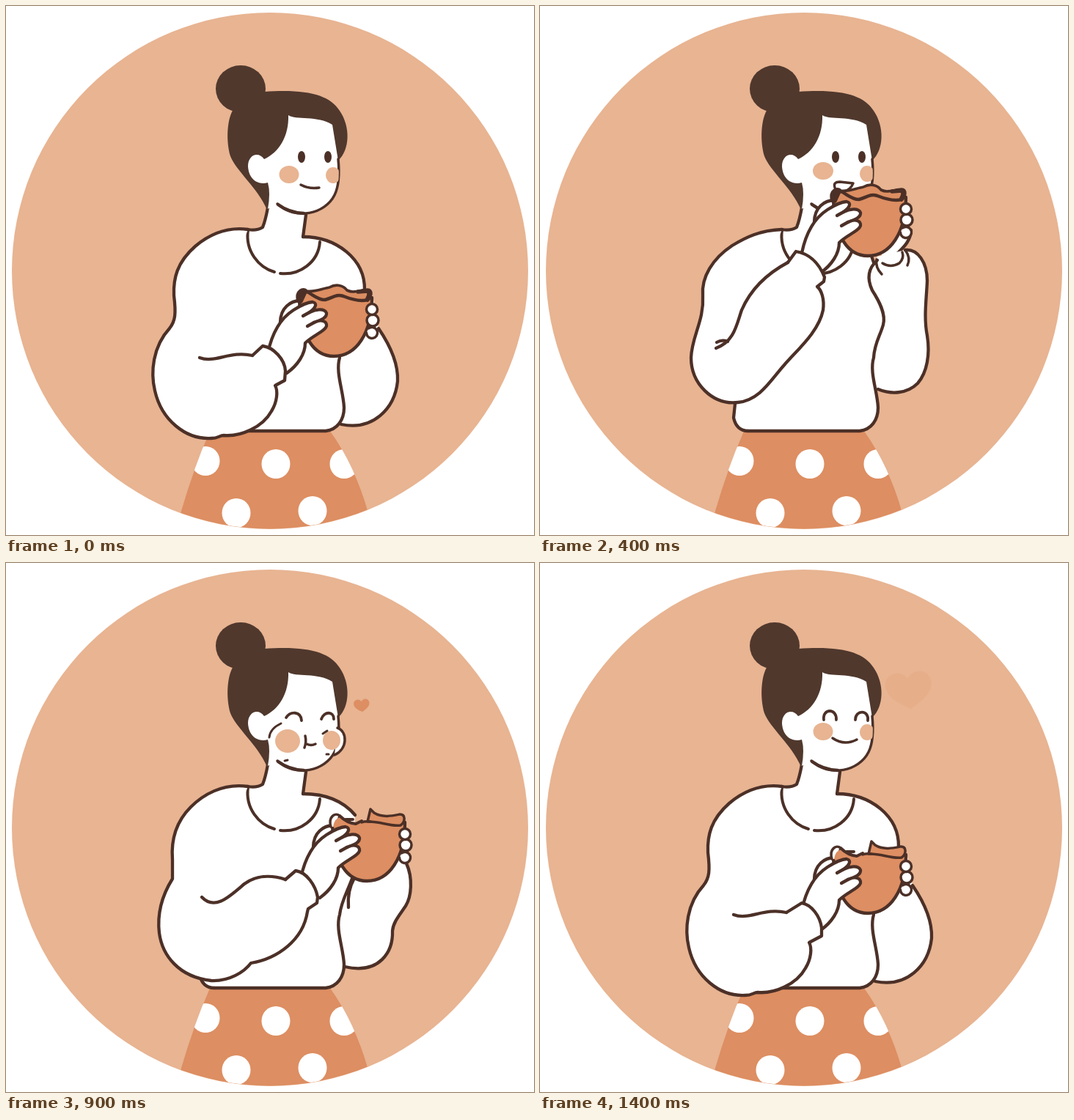
Animation, 720 px wide and 722 px high, one loop 1.5 s. Source, as an HTML page with a canvas:

```html
<!DOCTYPE html>
<html lang="en">
<head>
<meta charset="utf-8">
<title>Snack time</title>
<style>
html, body { margin: 0; width: 100%; height: 100%; overflow: hidden; background: #fff; }
canvas { display: block; width: 100%; height: 100%; }
</style>
</head>
<body>
<canvas id="stage" width="720" height="722"></canvas>
<script>
const ctx = document.getElementById('stage').getContext('2d');
const SKIN = '#fff', PEACH = '#e8b492', ORANGE = '#dd8e62', HAIR = '#50382d', INK = '#4c3027';
const LOOP = 1500;

const fill = (d, color = SKIN) => { ctx.fillStyle = color; ctx.fill(new Path2D(d)); };
const line = (d, w = 4.3) => { ctx.strokeStyle = INK; ctx.lineWidth = w; ctx.stroke(new Path2D(d)); };
const shape = (d, color, w) => { fill(d, color); line(d, w); };
const oval = (x, y, rx, ry, color) => {
  ctx.fillStyle = color;
  ctx.beginPath();
  ctx.ellipse(x, y, rx, ry, 0, 0, Math.PI * 2);
  ctx.fill();
};
const inside = (d, draw) => {
  ctx.save();
  ctx.clip(new Path2D(d));
  draw();
  ctx.restore();
};
const shifted = ([x, y], draw) => {
  ctx.save();
  ctx.translate(x, y);
  draw();
  ctx.restore();
};

// Arms and torso
const HEM = 'M284,580L436,580C452,578 461,565 461,548C460,525 449,500 455,480';
const RAISED = 'C456,460 464,450 468,435C472,420 462,402 453,388';
const lowArm = cuff => ({
  hold: [0, 0],
  arm: 'M330,305C300,301 277,312 258,328C233,350 228,372 229,395C232,420 231,430 223,440C200,465 197,500 203,525' +
    'C212,565 245,592 280,590C290,590 291,586 297,586C320,588 350,575 362,553C370,540 371,525 367,518' + cuff,
  fold: 'M264,480C285,488 305,470 336,477',
  side: HEM,
  shoulder: '489,388C490,345 450,315 405,315',
  sleeve: 'M508,440C525,465 535,490 534,512C530,550 500,580 457,571',
  sleeveEnd: 'L448,540L445,482L480,388L500,395Z'
});

const poses = {
  rest: lowArm('L380,511L381,498C380,482 365,466 350,464L336,477'),
  done: lowArm('L384,509L384,498C382,482 370,466 357,464L336,477'),
  lift: {
    hold: [45, -44],
    arm: 'M330,305C295,300 268,317 252,333C230,355 225,380 227,405L227,431C212,455 206,480 209,505' +
      'C213,535 235,565 280,570C305,571 325,558 334,546C370,540 405,515 411,476L412,472L424,464L425,456C422,440 410,422 395,420L381,432',
    fold: 'M267,456C285,475 305,455 325,438C340,427 360,425 381,432',
    side: HEM + 'C457,462 465,450 473,428M475,430Q465,448 467,470',
    shoulder: '476,344C460,325 435,315 405,315',
    sleeve: 'M546,410C555,430 553,455 545,468C537,480 528,490 527,502C528,530 510,562 462,551',
    sleeveEnd: 'L448,540L445,480L455,428L490,380Z'
  },
  near: {
    hold: [25, -100],
    arm: 'M330,305C300,303 275,316 260,328C235,350 226,378 228,405C228,435 212,455 211,482' +
      'C212,525 235,558 272,556C310,552 330,525 355,508C385,485 415,465 410,425L409,418L403,417L413,408C410,390 395,374 374,372L361,388',
    fold: 'M361,388C335,383 315,410 300,430C290,445 280,460 268,457Q262,452 272,453',
    side: HEM + 'C456,460 464,450 468,435C472,420 468,405 457,387L467,378M451,380L460,397',
    shoulder: '462,375C455,340 430,315 405,315',
    sleeve: 'M519,376C535,376 540,392 537,410C532,435 516,455 515,480C517,510 508,555 462,543',
    sleeveEnd: 'L448,540L445,480L455,435L445,375Z',
    wrist: true
  },
  mouth: {
    hold: [0, -137],
    arm: 'M330,305C300,306 280,316 262,327C235,345 220,370 222,395C224,430 207,450 206,480' +
      'C206,515 235,545 270,541C300,538 315,510 333,490C350,470 380,445 386,415C388,400 384,388 378,383L387,376L388,370C380,350 367,338 349,335L338,350',
    fold: 'M338,350C310,365 288,385 275,415C268,435 265,458 240,467M241,459Q248,455 256,458',
    side: HEM + RAISED + 'C447,375 445,360 460,347',
    shoulder: '455,350C450,330 430,315 405,315',
    sleeve: 'M498,333C515,331 528,350 528,375C527,400 523,425 528,450C532,475 528,500 515,515C500,530 478,530 461,523',
    sleeveEnd: 'L448,520L445,478L455,435L445,375L460,342Z',
    wrist: true
  }
};

// Faces: cheeks are [x, y, rx, ry]
const DOTS = 'dots';
const ARCS = 'M382,211C388,202 402,202 403,215M430,213C434,202 447,202 447,213';
const PUFF = 'M452,225C466,230 466,254 448,262';
const CALM = [[386, 230, 13.5, 12], [446, 231, 10, 11]];
const faces = {
  calm: { eyes: DOTS, cheeks: CALM, mouth: 'M402,244Q413,250 427,248' },
  open: { eyes: DOTS, cheeks: [[386, 225, 14, 12], [446, 229, 10, 11]], mouth: 'M403,250Q398,240 409,240L427,242Q424,250 415,253' },
  bite: {
    eyes: 'M391,209Q399,206 407,215M433,215Q440,209 447,212', puff: PUFF,
    cheeks: [[382, 242, 15, 15], [447, 242, 11, 14]],
    mouth: 'M407,235L408,248L430,244M432,237L430,250', marks: 'M362,230Q354,247 362,266M371,268L380,274'
  },
  chew: {
    eyes: ARCS, puff: PUFF, cheeks: [[384, 244, 15, 15], [445, 242, 11, 13]],
    mouth: 'M408,238Q410,245 407,253M409,247L423,248M430,240Q428,246 431,251',
    marks: 'M372,223Q358,235 361,250M366,262L374,267M436,229L439,232'
  },
  full: {
    eyes: ARCS, puff: PUFF, cheeks: [[384, 243, 17, 16], [444, 242, 12, 13]],
    mouth: 'M408,236Q410,244 407,252M410,247Q416,250 422,247',
    marks: 'M375,219Q360,226 359,238M432,233L438,229M437,261L440,261M380,270L384,269'
  },
  glad: {
    eyes: 'M387,214C385,198 405,198 404,214M430,214C430,200 449,200 447,215',
    cheeks: CALM, mouth: 'M399,239Q415,250 432,241'
  }
};

// start ms, pose, face, bitten
const steps = [
  [0, 'rest', 'calm', false],
  [200, 'lift', 'calm', false],
  [300, 'near', 'calm', false],
  [400, 'mouth', 'open', false],
  [500, 'mouth', 'bite', false],
  [600, 'mouth', 'bite', true],
  [800, 'near', 'chew', true],
  [900, 'lift', 'full', true],
  [1000, 'done', 'full', true],
  [1100, 'done', 'chew', true],
  [1200, 'done', 'full', true],
  [1300, 'done', 'glad', true]
];

function backdrop() {
  ctx.fillStyle = '#fff';
  ctx.fillRect(0, 0, 720, 722);
  oval(360, 361.5, 352, 352.5, PEACH);
  const skirt = 'M278,580Q256,630 238,692L238,722L493,722L493,688C482,650 465,612 442,580Z';
  inside('M8,361a352,352.5 0 0 0 704,0Z', () => inside(skirt, () => {
    fill(skirt, ORANGE);
    for (const [x, y] of [[272, 621], [368, 625], [461, 625], [314, 692], [418, 689]]) oval(x, y, 19.5, 20, SKIN);
  }));
}

function body(p) {
  const edge = p.side.slice(1).split('M')[0];
  fill('M360,262L357,277Q354,292 350,302L330,305L270,400L266,545L264,562Q268,580 ' + edge + 'L' + p.shoulder + 'L410,270Z');
  line('M266,543L264,562Q268,580 284,580');
  line('M357,275Q354,292 350,302Q342,307 330,305M409,285L405,315');
  line('M' + p.shoulder);
  line('M330,306C326,335 345,357 366,363M374,365C400,368 426,350 428,322', 4);
}

function head(f) {
  oval(320, 113, 34, 32, HAIR);
  fill('M310,141C301,155 300,185 306,205C313,224 343,248 356,278L385,220L453,211C469,196 470,165 455,143C441,121 410,113 352,117Z', HAIR);
  const face = 'M385,149C395,156 425,149 445,162L452,205C455,225 455,245 448,258C438,283 395,292 369,269' +
    'L357,277Q361,255 357,241C343,245 331,236 330,219C330,203 344,198 352,209C372,200 386,178 385,149Z';
  fill(face);
  line('M453,209C455,230 454,246 448,258C435,284 395,293 370,270', 3.5);
  line('M371,271Q386,282 406,283', 4.5);
  if (f.puff) shape(f.puff, SKIN, 3.5);
  const draw = () => f.cheeks.forEach(c => oval(...c, PEACH));
  f.puff ? draw() : inside(face, draw);
  if (f.eyes === DOTS) {
    oval(403, 206, 5, 8, INK);
    oval(439, 206, 5, 8, INK);
  } else line(f.eyes, 3.8);
  line(f.mouth, 3.5);
  if (f.marks) line(f.marks, 3);
}

function cup(bitten) {
  const bowl = 'M400,402C402,452 420,478 447,478C478,478 499,446 499,398';
  shape('M374,432C374,412 388,402 402,402L410,420');
  if (bitten) {
    fill(bowl + 'L492,402C478,404 465,396 452,397Q440,398 432,400L411,390Z', ORANGE);
    line(bowl);
    shape('M398,404C394,390 404,384 410,389L406,404', SKIN, 3.5);
    fill('M401,404Q403,392 411,391L424,402L418,410Z', ORANGE);
    line('M410,389Q420,399 432,400L440,396M418,394L428,394', 4);
    shape('M448,397L452,380L457,385C468,392 482,389 492,387C500,387 500,397 493,402C478,404 465,396 448,397', ORANGE, 3.5);
    line('M440,398Q445,396 452,397', 3.5);
  } else {
    fill(bowl + 'L493,387C484,387 475,393 465,388C460,381 450,379 441,384C430,386 420,392 410,388Z', ORANGE);
    line(bowl);
    line('M398,403C394,388 406,384 410,389C420,391 430,386 441,384C450,379 460,381 465,388C475,393 484,387 493,387C500,387 499,397 493,402', 3.7);
    line('M410,390C418,393 424,401 435,401C446,398 450,393 460,396C470,400 482,404 493,401', 4.5);
    line('M400,401Q400,391 408,390L402,403M480,390L493,389Q497,392 493,399', 5.5);
  }
}

function fingers() {
  ctx.fillStyle = SKIN;
  ctx.strokeStyle = INK;
  ctx.lineWidth = 3.5;
  // the lowest finger stays open on the cup side
  for (const [x, y, r, from] of [[499, 446, 7.5, -2.2], [500, 429, 8, -Math.PI], [499, 414, 7.5, -Math.PI]]) {
    ctx.beginPath();
    ctx.arc(x, y, r, from, Math.PI);
    ctx.fill();
    ctx.stroke();
  }
}

function hand() {
  shape('M357,474C364,440 378,424 392,415C403,408 412,404 418,404C426,406 421,413 414,418C422,414 434,412 437,419' +
    'C438,426 428,429 420,432C430,427 438,430 437,437C435,444 418,450 408,460C408,475 398,490 383,501');
  line('M414,418L405,423M420,432L411,437');
}

function heart(t) {
  if (t < 800) return;
  const k = Math.min(5, Math.floor((t - 800) / 100)) / 5;
  const out = 1 - (1 - k) ** 2;
  const size = 11 + 52 * k;
  ctx.save();
  ctx.globalAlpha = Math.min(1, 1 - (k - 0.4) * 1.42);
  ctx.translate(475 + 28 * out, 206 - 33 * out);
  ctx.rotate(-0.1);
  ctx.scale(size / 100, size / 100);
  fill('M0,42C-20,30 -50,14 -50,-12C-50,-40 -14,-48 0,-24C14,-48 50,-40 50,-12C50,14 20,30 0,42Z', ORANGE);
  ctx.restore();
}

function render(t) {
  const [, pose, face, bitten] = steps.filter(s => s[0] <= t).pop();
  const p = poses[pose];
  ctx.lineCap = ctx.lineJoin = 'round';
  backdrop();
  body(p);
  head(faces[face]);
  if (p.wrist) shifted(p.hold, () => {
    fill('M506,443C504,458 495,466 489,474L494,486L465,488L470,440Z');
    line('M506,443C505,458 496,466 488,474');
  });
  fill(p.sleeve + p.sleeveEnd);
  line(p.sleeve);
  line(p.side);
  if (p.wrist) shifted(p.hold, () =>
    line('M459,483Q457,494 466,503M467,488Q478,495 490,488Q497,481 494,473M498,470Q506,481 501,491', 3.5));
  shifted(p.hold, () => { cup(bitten); fingers(); hand(); });
  fill(p.arm + 'L322,325Z');
  line(p.arm);
  line(p.fold);
  heart(t);
}

function tick() {
  render(performance.now() % LOOP);
  requestAnimationFrame(tick);
}
tick();
</script>
</body>
</html>
```
